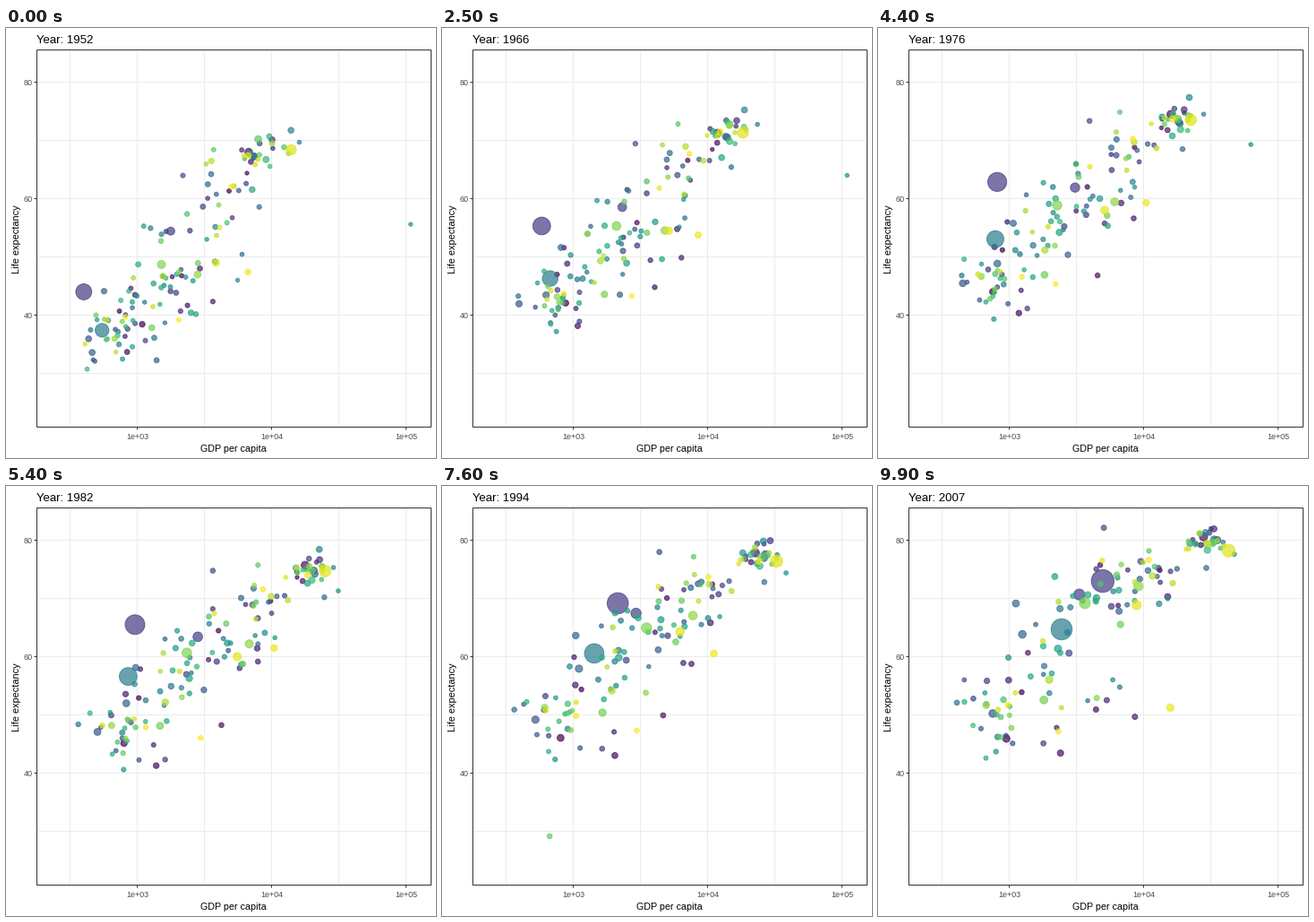
Write a matplotlib script that moves like this. It is 480 by 480 pixels and loops after 10 s.

```python
import numpy as np
import matplotlib.pyplot as plt
from matplotlib.animation import FuncAnimation
from matplotlib.patches import Rectangle

FRAMES, INTERVAL = 100, 100
FIRST, LAST, STEP = 1952, 2007, 5
YEARS = np.arange(FIRST, LAST + 1, STEP)
T = np.linspace(0, 1, len(YEARS))
COUNT = 142
PX = 0.72  # points per pixel at 100 dpi

plt.rcParams["font.family"] = ["Liberation Sans", "DejaVu Sans"]

# The few dots that stand apart.
# rank: (population in millions at both ends, (year, income, life), ...)
LANDMARKS = {
    24: ((556, 1319), (1952, 400, 44), (1957, 576, 50.5), (1962, 488, 44.5),
         (1967, 613, 58.4), (1982, 962, 65.5), (2007, 4959, 73)),
    58: ((372, 1110), (1952, 547, 37.4), (1982, 856, 56.6),
         (2007, 2452, 64.7)),
    71: ((0.2, 2.5), (1952, 108382, 55.6), (1972, 109348, 67.7),
         (1982, 31354, 71.3), (2007, 47307, 77.6)),
    107: ((2.5, 8.9), (1952, 493, 40), (1987, 848, 44), (1992, 737, 23.6),
          (1997, 590, 36.1), (2007, 863, 46.2)),
    134: ((158, 301), (1952, 13990, 68.4), (1982, 25010, 74.7),
          (2007, 42952, 78.2)),
}


class Tier:
    """Group of dots sharing a (mean, spread) of log income and life."""

    def __init__(self, share, income, life, bends, walk, bump, pop):
        self.share = share
        self.income, self.life = np.array(income), np.array(life)
        self.bends, self.walk, self.bump, self.pop = bends, walk, bump, pop

    def path(self, rng):
        wealth = correlated(rng, rng.normal(), 0.7)
        health = correlated(rng, 0.5 * wealth[0] + 0.85 * rng.normal(), 0.6)
        g = self.income[:, 0] + self.income[:, 1] * wealth
        e = self.life[:, 0] + self.life[:, 1] * health
        income = lerp(*g, T ** self.bends[0]) + bridge(rng, self.walk)
        life = lerp(*e, T ** self.bends[1]) + bridge(rng, 0.3)
        life += self.bump * rng.random() * np.sin(np.pi * T ** 1.4)
        start, growth = self.pop
        pop = min(start * np.exp(rng.normal(0, 1.15)), 70)
        return (np.clip(income, 2.4, 4.69), np.clip(life, 30, 82.6),
                lerp(radius(pop), radius(pop * growth), T))


TIERS = [
    Tier(0.18, [(3.92, 0.14), (4.48, 0.09)], [(67, 2.8), (79.6, 1.2)],
         (0.65, 0.9), 0.01, 0, (6, 1.3)),
    Tier(0.17, [(3.55, 0.17), (4.02, 0.15)], [(60, 5), (74.7, 2)],
         (0.55, 0.7), 0.03, 0, (4, 1.9)),
    Tier(0.24, [(3.26, 0.24), (3.7, 0.24)], [(47, 6), (70.5, 3)],
         (0.8, 0.85), 0.04, 0, (5, 2.8)),
    Tier(0.06, [(3.4, 0.28), (3.75, 0.25)], [(41, 4), (51, 5)],
         (0.6, 0.8), 0.05, 14, (1.5, 3)),
    Tier(0.35, [(2.92, 0.2), (3.04, 0.24)], [(38.5, 3.6), (53, 5.5)],
         (0.8, 0.75), 0.045, 4, (3.5, 3)),
]


def lerp(a, b, t):
    return a + (b - a) * t


def to_x(log_income):
    return 146.5 + 150 * (log_income - 3)


def to_y(life):
    return 60.5 + 6.5 * (80 - life)


def radius(pop):
    return 2.49 + 0.2938 * np.sqrt(pop)


def correlated(rng, first, rho):
    return np.array([first, rho * first
                     + np.sqrt(1 - rho ** 2) * rng.normal()])


def bridge(rng, scale):
    """Random walk that starts and ends at zero."""
    walk = np.cumsum(rng.normal(0, scale, len(T)))
    return walk - lerp(walk[0], walk[-1], T)


def landmark_path(pop, *keys):
    years, income, life = np.array(keys, float).T
    return (np.interp(YEARS, years, np.log10(income)),
            np.interp(YEARS, years, life),
            lerp(radius(pop[0]), radius(pop[1]), T))


def build():
    rng = np.random.default_rng(52)
    paths = np.zeros((COUNT, 3, len(T)))
    for rank, spec in LANDMARKS.items():
        paths[rank] = landmark_path(*spec)
    free = rng.permutation([k for k in range(COUNT) if k not in LANDMARKS])
    ends = np.cumsum([tier.share for tier in TIERS])
    for n, rank in enumerate(free):
        tier = TIERS[np.searchsorted(ends[:-1], n / len(free), side="right")]
        paths[rank] = tier.path(rng)
    return to_x(paths[:, 0]), to_y(paths[:, 1]), paths[:, 2]


def label(x, y, text, size, color="black", **kw):
    return ax.text(x, y, text, fontsize=size * PX, color=color,
                   va="baseline", **kw)


def line(xs, ys, color, z):
    ax.plot(xs, ys, color=color, lw=PX, zorder=z, solid_capstyle="butt",
            snap=False)


fig = plt.figure(figsize=(4.8, 4.8), dpi=100, facecolor="white")
ax = fig.add_axes([0, 0, 1, 1])
ax.set(xlim=(0, 480), ylim=(480, 0))
ax.axis("off")

LEFT, RIGHT, TOP, BOTTOM = 34.5, 474.5, 24.5, 445.5
GRID, TICK, GREY = "#EBEBEB", "#333333", "#4D4D4D"

for g in np.arange(2.5, 5.1, 0.5):
    line([to_x(g)] * 2, [TOP, BOTTOM], GRID, 0)
for e in range(30, 81, 10):
    line([LEFT, RIGHT], [to_y(e)] * 2, GRID, 0)
for g in (3, 4, 5):
    line([to_x(g)] * 2, [BOTTOM, BOTTOM + 3], TICK, 4)
    label(to_x(g), 459, f"1e+0{g}", 9, GREY, ha="center")
for e in (40, 60, 80):
    line([LEFT - 3, LEFT], [to_y(e)] * 2, TICK, 4)
    label(30, to_y(e) + 3.5, str(e), 9, GREY, ha="right")
ax.add_patch(Rectangle((LEFT, TOP), RIGHT - LEFT, BOTTOM - TOP, fill=False,
                       ec=TICK, lw=PX, zorder=5, snap=False))
label(254, 473, "GDP per capita", 10.7, ha="center")
label(15, 236, "Life expectancy", 11, ha="center", rotation=90,
      rotation_mode="anchor")
title = label(34, 17, "", 13.2)

X, Y, R = build()
colors = plt.get_cmap("viridis")(np.linspace(0, 1, COUNT))
colors[:, 3] = 0.7
dots = ax.scatter(X[:, 0], Y[:, 0], s=1, facecolors=colors, edgecolors=colors,
                  linewidths=PX, zorder=3)


def update(frame):
    year = FIRST + (LAST - FIRST) * frame / (FRAMES - 1)
    pos = (year - FIRST) / STEP
    i = min(int(pos), len(T) - 2)
    x, y, r = (lerp(a[:, i], a[:, i + 1], pos - i) for a in (X, Y, R))
    dots.set_offsets(np.column_stack([x, y]))
    dots.set_sizes(((2 * r - 1) * PX) ** 2)
    title.set_text(f"Year: {round(year)}")
    return dots, title


anim = FuncAnimation(fig, update, frames=FRAMES, interval=INTERVAL,
                     repeat=True, repeat_delay=0, blit=False)
plt.show()
```
